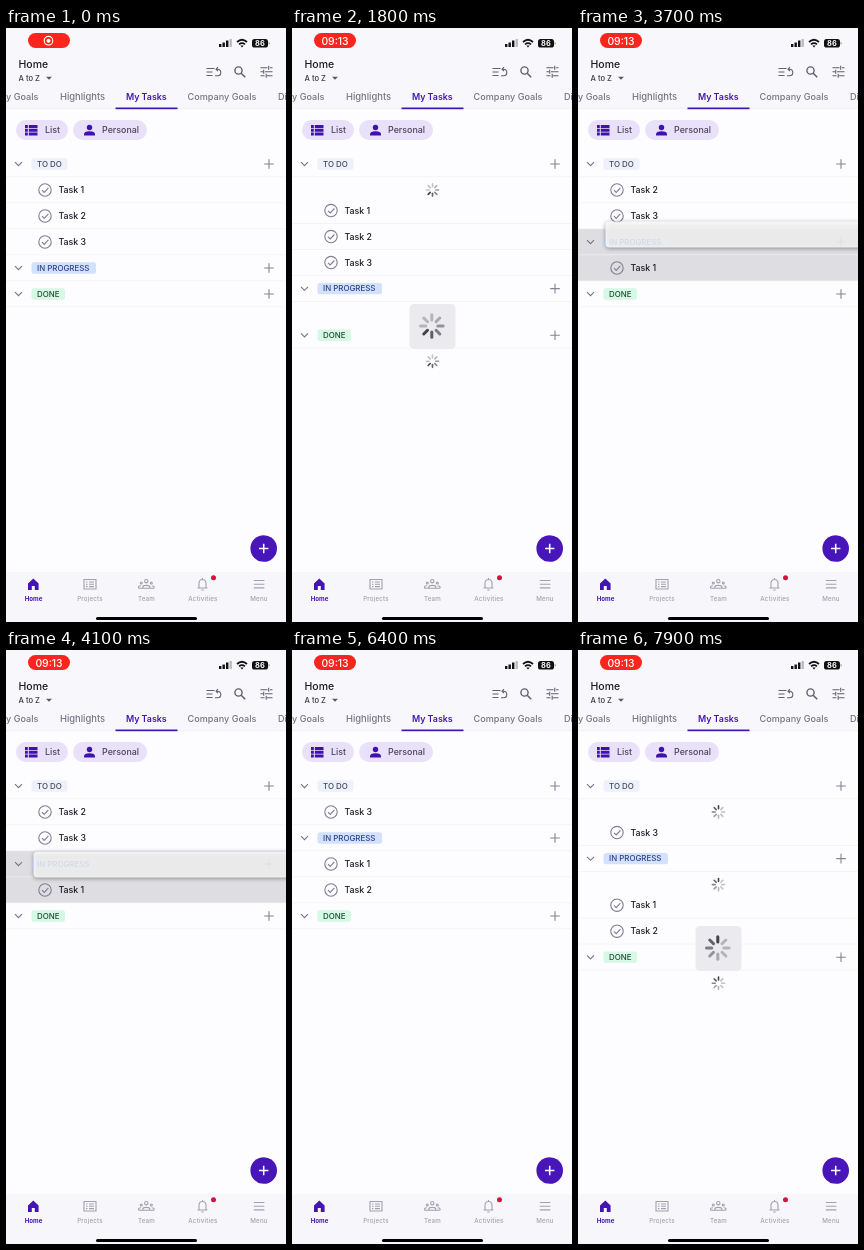
An HTML page for the animation above (8 s loop, 280 px wide and 594 px high).

```html
<!DOCTYPE html>
<html lang="en">
<head>
<meta charset="utf-8">
<title>Task board</title>
<style>
html, body { margin: 0; width: 100%; height: 100%; overflow: hidden; background: #fdfcff; }
svg { display: block; width: 280px; height: 594px; font: 500 9.1px Inter, Roboto, sans-serif; }
.line { fill: none; stroke-width: 1.1; }
.mid { text-anchor: middle; }
.panel { fill: #fff; fill-opacity: .82; filter: drop-shadow(0 1px 2px #0007); }
</style>
</head>
<body>
<svg viewBox="0 0 280 594">
  <rect width="280" height="594" fill="#fdfcff"/>
  <rect width="280" height="81" fill="#f8f7fb"/>
  <rect y="544" width="280" height="50" fill="#f7f7fb"/>

  <!-- status bar -->
  <rect id="pill" x="22" y="5" width="42" height="15" rx="7.5"/>
  <g id="record" class="line" stroke="#fff"><circle cx="42.5" cy="12.7" r="4.3"/><circle cx="42.5" cy="12.7" r="2" fill="#fff" stroke="none"/></g>
  <text id="clock" class="mid" x="43" y="16.6" font-size="10.4" fill="#fff">09:13</text>
  <path d="M213 16h2.4v3H213zM216.500 14.500h2.400v4.500h-2.400zM220 12.500h2.400v6.500H220z" fill="#111"/>
  <path d="M223.500 11h2.400v8h-2.400z" fill="#bbb"/>
  <g class="line" stroke="#111" style="stroke-width:1.7"><path d="M231 14q5-4.500 10 0M233 16.300q3-2.500 6 0"/></g>
  <path d="M234.300 17.500h3.400L236 19.400z" fill="#111"/>
  <rect x="246" y="11" width="16" height="8.500" rx="2.600" fill="#111"/>
  <path d="M262.800 13.700q1.400 1.500 0 3z" fill="#111"/>
  <text class="mid" x="254" y="18" font-size="7.500" font-weight="700" fill="#fff">86</text>

  <!-- title and tools -->
  <text x="12.500" y="40" font-size="10.500" fill="#1d1b26">Home</text>
  <text x="12.500" y="53" font-size="7.600" fill="#3b3946">A to Z</text>
  <path d="M40 48.800h6l-3 3z" fill="#5b5868"/>
  <g class="line" stroke="#625f70">
    <path d="M200.500 40.500h8M200.500 44h6M200.500 47.500h6M209 47.800h2.500a3 3 0 0 0 0-6.600h-1.500m2-2-2 2 2 2"/>
    <circle cx="232.500" cy="42.500" r="3.600" style="stroke-width:1.4"/><path d="M235.200 45.200l4 4" style="stroke-width:1.6"/>
    <path d="M254.500 39.800h7M264 39.800h2.500M262.700 37.800v4M254.500 43.800h2.500M259 43.800h7.500M257.700 41.800v4M254.500 47.800h4M261 47.800h5.500M260.200 45.800v4"/>
  </g>
  <g fill="#777484">
    <text x="0" y="71.500">y Goals</text>
    <text class="mid" x="76.500" y="71.500" font-size="9.400">Highlights</text>
    <text class="mid" x="140.300" y="71.500" font-size="8.900" font-weight="600" fill="#4316b4">My Tasks</text>
    <text class="mid" x="216" y="71.500">Company Goals</text>
    <text x="272" y="71.500">Di</text>
  </g>
  <rect y="80.500" width="280" height=".6" fill="#ecebf1"/>
  <rect x="109.500" y="79.500" width="62" height="1.700" fill="#4316b4"/>

  <!-- chips -->
  <g fill="#e9e0fa"><rect x="10" y="92" width="52" height="20" rx="10"/><rect x="67" y="92" width="74" height="20" rx="10"/></g>
  <g fill="#3f12ad">
    <path d="M19 97h2.800v3H19zm3.800 0H31.500v3H22.800zM19 100.800h2.800v3H19zm3.800 0H31.500v3H22.800zM19 104.600h2.800v3H19zm3.800 0H31.500v3H22.800z"/>
    <circle cx="83.500" cy="99.500" r="2.700"/><path d="M78 107.500v-1.200q0-3 5.500-3t5.500 3v1.200z"/>
  </g>
  <g fill="#4a4657"><text x="39" y="105.300" font-size="8.900">List</text><text x="96" y="105.300" font-size="8.900">Personal</text></g>

  <g id="board"></g>

  <!-- floating button and navigation -->
  <circle cx="257.700" cy="520.500" r="13.300" fill="#4715b8"/>
  <path class="line" d="M253 520.500h9.400M257.700 515.800v9.400" stroke="#fff" style="stroke-width:1.5"/>
  <path d="M22 562v-6.500l5.300-5 5.300 5v6.500h-3.800v-4h-3v4z" fill="#4316b4"/>
  <g class="line" stroke="#a3a0ae">
    <path d="M78 551.500h12v9.500H78zM80 554h1.500M83 554h5M80 556.300h1.500M83 556.300h5M80 558.600h1.500M83 558.600h5"/>
    <circle cx="140.300" cy="553.200" r="1.700"/><circle cx="135.300" cy="555" r="1"/><circle cx="145.300" cy="555" r="1"/>
    <path d="M136.800 560.200v-1q0-1.800 3.500-1.800t3.500 1.800v1zM132.500 560.200v-1q0-1.500 2.500-1.500M148.100 560.200v-1q0-1.500-2.500-1.500M132.500 560.200h15.600"/>
    <path d="M191.500 560h10M193 560v-4.500q0-4 3.500-4t3.500 4v4.500M196.500 551.500v-1.500M195.300 562h2.400"/>
    <path d="M247.800 552.500h10.600M247.800 556.200h10.600M247.800 559.900h10.600"/>
  </g>
  <circle cx="207.500" cy="549.700" r="2.500" fill="#d3123d"/>
  <g class="mid" font-size="6.200" letter-spacing=".2" fill="#a3a0ae">
    <text x="27.500" y="573" font-weight="700" fill="#4316b4" letter-spacing="0">Home</text>
    <text x="84" y="573">Projects</text><text x="140.500" y="573">Team</text>
    <text x="197" y="573">Activities</text><text x="253" y="573">Menu</text>
  </g>
  <rect x="90" y="589" width="101" height="3" rx="1.500" fill="#000"/>
</svg>

<script>
const LOOP = 8000, ROW = 26, LOADER = 20.6;
const $ = id => document.getElementById(id);

const sections = [
  { name: 'TO DO', width: 36, fill: '#eef1f9', ink: '#3d4a62' },
  { name: 'IN PROGRESS', width: 64.5, fill: '#d4e1fc', ink: '#2a418d' },
  { name: 'DONE', width: 33.5, fill: '#d6f8e4', ink: '#1f4b36' }
];

// Each move: lift, travel, release, reload of the lists, settled.
const moves = [
  { lift: 300, go: 400, arrive: 800, drop: 880, gone: 950, load: 1100, end: 2300, from: 149, to: 220, head: 6, ref: 900 },
  { lift: 3300, go: 3400, arrive: 3800, drop: 4250, gone: 4320, load: 4450, end: 5700, from: 175, to: 201.5, head: 4, ref: 4900 },
  { lift: 6700, go: 6800, arrive: 7200, drop: 7600, gone: 7670, load: 7750, end: 8400, from: 149, to: 177, head: 0, ref: 7900 }
];
moves[1].from = 175 - ROW;

const ease = p => (p = Math.max(0, Math.min(1, p)), p * p * (3 - 2 * p));
const rule = y => `<rect y="${y - .5}" width="280" height=".7" fill="#f1eff5"/>`;

function spinner(x, y, r, head) {
  const alpha = [.88, .72, .57, .45, .34, .28, .28, .28];
  let out = '';
  for (let i = 0; i < 8; i++) {
    out += `<line y1="${-r * .48}" y2="${-r * .9}" transform="translate(${x} ${y}) rotate(${i * 45})"
      stroke="#2c2b35" stroke-width="${r * .24}" stroke-linecap="round" opacity="${alpha[(head - i + 8) % 8]}"/>`;
  }
  return out;
}

function header(s, y) {
  return `<path class="line" d="M9 ${y - 1.8}l3.500 3.500 3.500-3.500" stroke="#777488"/>
    <rect x="25.500" y="${y - 5.7}" width="${s.width}" height="11.400" rx="2.500" fill="${s.fill}"/>
    <text x="31" y="${y + 2.8}" font-size="7.900" fill="${s.ink}">${s.name}</text>
    <path class="line" d="M258.200 ${y}h9.600M263 ${y - 4.8}v9.600" stroke="#858294"/>` + rule(y + 13);
}

function task(n, y) {
  return `<g class="line" stroke="#807d93"><circle cx="39" cy="${y}" r="6.200"/><path d="M36 ${y + .2}l2.200 2.200 4.200-4.500"/></g>
    <text x="52.500" y="${y + 3.2}" font-size="8.800" fill="#1d1b26">Task ${n}</text>` + rule(y + 13);
}

function board(t) {
  const done = moves.filter(m => t >= m.end).length;
  const m = moves[done];
  const busy = m && t >= m.drop, loading = m && t >= m.load;
  const dragging = m && t >= m.lift && t < m.gone;
  const head = m ? (((m.head + Math.floor((t - m.ref) / 125)) % 8) + 8) % 8 : 0;
  const panelY = m ? m.from + (m.to - m.from) * ease((t - m.go) / (m.arrive - m.go)) : 0;
  const lists = [[1, 2, 3].slice(done), [1, 2, 3].slice(0, done), []];

  let y = 136, out = '', shade = '';
  sections.forEach((s, i) => {
    const top = y - 13;
    out += header(s, y);
    y += ROW;
    if (loading) {
      out += spinner(140.5, y, 6.8, head);
      y += LOADER;
    }
    for (const n of lists[i]) {
      out += task(n, y);
      y += ROW;
    }
    const bottom = y - 13;
    if (i == 1 && dragging && !busy && panelY + 13 > top)
      shade = `<rect y="${top}" width="280" height="${bottom - top}" fill="#dedde1"/>`;
  });
  if (dragging) out += `<rect class="panel" x="27.500" y="${panelY}" width="270" height="26" rx="4"/>`;
  if (busy) out += `<rect x="117.500" y="276" width="46" height="45" rx="4.500" fill="#ebeaee"/>` + spinner(139.8, 298, 12.6, head);
  return shade + out;
}

function draw(now) {
  const t = now % LOOP;
  const pulse = .5 + .5 * Math.cos(t / 1000 * Math.PI);
  $('pill').setAttribute('fill', `rgb(${240 + 12 * pulse},${32 + 6 * pulse},${27 + 4 * pulse})`);
  $('record').style.display = t < 1800 ? '' : 'none';
  $('clock').style.display = t < 1800 ? 'none' : '';
  $('board').innerHTML = board(t);
  requestAnimationFrame(draw);
}
draw(performance.now());
</script>
</body>
</html>
```
